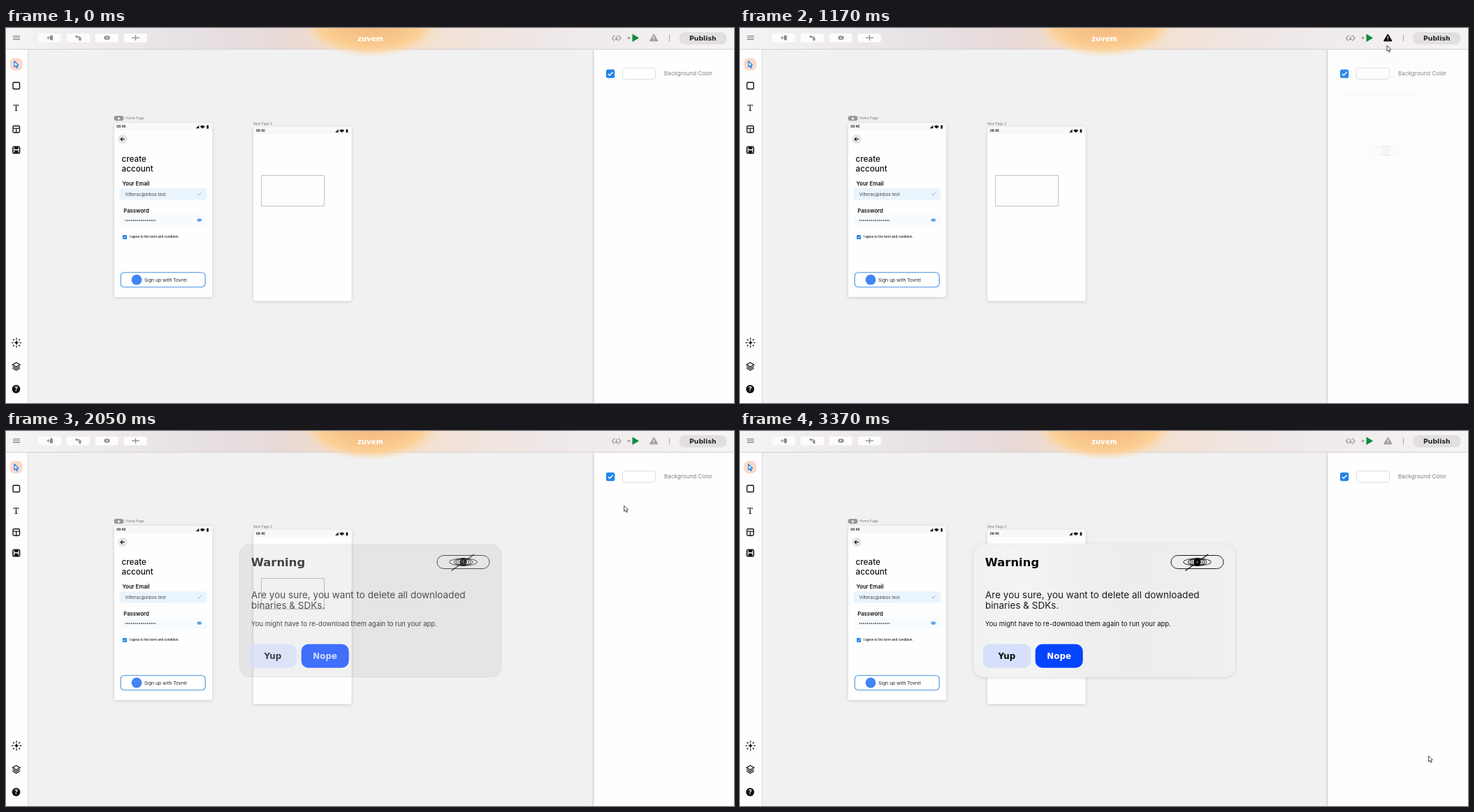
Recreate the animation shown at these times as an HTML page with a canvas. Size 1042 by 538 pixels, loop 3.44 s.

```html
<!DOCTYPE html>
<html lang="en">
<head>
<meta charset="utf-8">
<title>App builder</title>
<style>
html, body { margin: 0; width: 100%; height: 100%; overflow: hidden; background: #f1f1f1; }
canvas { display: block; width: 1042px; height: 538px; }
</style>
</head>
<body>
<canvas id="stage" width="1042" height="538"></canvas>
<script>
const c = document.getElementById('stage').getContext('2d');
const LOOP = 3440, STEPS = 50, STEP = LOOP / STEPS, LEAD = 20;
const SANS = 'Inter, "Noto Sans", sans-serif';
const WIDE = '"DejaVu Sans", Verdana, sans-serif';
const INK = '#111', GRAY = '#8c8a8c';

const spot = (x, y) => ({ x, y });
const START = spot(760, 433), CHECK = spot(869, 63), ALERT = spot(926, 25),
  ROW = spot(912, 95), YUP = spot(373, 334), END = spot(985.5, 466);

// Pointer trips: each eases out along a curve bent towards `via`
const TRIPS = [
  { start: 1, end: 9, from: START, via: spot(646, 90), to: CHECK },
  { start: 10, end: 17, from: CHECK, via: spot(985, 85), to: ALERT },
  { start: 18, end: 26, from: ALERT, to: ROW },
  { start: 29.75, end: 40, from: ROW, to: YUP },
  { start: 45, end: 49, from: YUP, via: spot(650, -35), to: END }
];

const clamp = v => Math.max(0, Math.min(1, v));
const ramp = (s, a, b) => clamp((s - a) / (b - a));
const easeOut = u => 1 - (1 - u) ** 2.1;
const within = (s, a, b) => s >= a && s <= b;

function pointerAt(s) {
  const { start, end, from, to, via = spot((from.x + to.x) / 2, (from.y + to.y) / 2) } =
    TRIPS.findLast(t => s >= t.start) || TRIPS[0];
  const k = easeOut(ramp(s, start, end)), q = 1 - k;
  const mix = axis => q * q * from[axis] + 2 * q * k * via[axis] + k * k * to[axis];
  return spot(mix('x'), mix('y'));
}

function paint(fill, stroke, width = 1) {
  if (fill) { c.fillStyle = fill; c.fill(); }
  if (stroke) { c.strokeStyle = stroke; c.lineWidth = width; c.stroke(); }
}
function box(x, y, w, h, r, fill, stroke, width) {
  c.beginPath();
  c.roundRect(x, y, w, h, r);
  paint(fill, stroke, width);
}
function oval(x, y, rx, ry, fill, stroke, width) {
  c.beginPath();
  c.ellipse(x, y, rx, ry, 0, 0, Math.PI * 2);
  paint(fill, stroke, width);
}
function line(x0, y0, x1, y1, color, width = 1) {
  c.beginPath();
  c.moveTo(x0, y0);
  c.lineTo(x1, y1);
  paint(null, color, width);
}
const hline = (x, y, w, color, width) => line(x, y, x + w, y, color, width);
const vline = (x, y, h, color, width) => line(x, y, x, y + h, color, width);
function plus(x, y, rx, ry, color, width) {
  hline(x - rx, y, 2 * rx, color, width);
  vline(x, y - ry, 2 * ry, color, width);
}
// Open arrow with its tip at x, y
function chevron(x, y, w, h, turn, color, width) {
  c.save();
  c.translate(x, y);
  c.rotate(turn * Math.PI / 2);
  c.beginPath();
  c.moveTo(-w, -h); c.lineTo(0, 0); c.lineTo(-w, h);
  c.restore();
  paint(null, color, width);
}
// Points on one or two alternating radii: polygons and stars
function star(x, y, n, rx, ry, fill, stroke, width, inner = 1) {
  c.beginPath();
  for (let i = 0; i < n; i++) {
    const a = i * 2 * Math.PI / n - Math.PI / 2, k = i % 2 ? inner : 1;
    c.lineTo(x + Math.cos(a) * rx * k, y + Math.sin(a) * ry * k);
  }
  c.closePath();
  paint(fill, stroke, width);
}
function tick(x, y, k, color, width) {
  c.beginPath();
  c.moveTo(x - 3 * k, y); c.lineTo(x - k, y + 2 * k); c.lineTo(x + 3 * k, y - 2.2 * k);
  paint(null, color, width);
}
function text(str, x, y, size, color, weight = 400, align = 'left', face = SANS) {
  c.font = `${weight} ${size}px ${face}`;
  c.textAlign = align;
  c.fillStyle = color;
  c.fillText(str, x, y);
}
const wide = (str, x, y, size, color, align = 'center') => text(str, x, y, size, color, 700, align, WIDE);

function shadowed(blur, color, draw) {
  c.save();
  c.shadowBlur = blur;
  c.shadowColor = color;
  c.shadowOffsetY = 1;
  draw();
  c.restore();
}
function spread(gradient, colors) {
  colors.forEach((color, i) => gradient.addColorStop(i / (colors.length - 1), color));
  return gradient;
}
const across = (x0, x1, ...colors) => spread(c.createLinearGradient(x0, 0, x1, 0), colors);

function glow() {
  c.save();
  c.translate(522, -4);
  c.scale(1, .46);
  oval(0, 0, 100, 100, spread(c.createRadialGradient(0, 0, 0, 0, 0, 100),
    ['#f5bb84', '#f6bf86', '#f8c68a', '#fbd198', 'rgba(250,222,190,0)']));
  c.restore();
}

function topBar(alert) {
  c.fillStyle = across(0, 1042, '#f6f4f5', '#eeeaed', '#e6e1e5', '#e8d9d8', '#f6dcc0',
    '#f2e3da', '#eee8e9', '#f2eeef', '#f7f4f5');
  c.fillRect(0, 0, 1042, 30);
  hline(0, 30.5, 1042, '#d3d0d1');
  glow();
  wide('zuvem', 521.5, 18.5, 10, '#fff');

  for (let i = 0; i < 3; i++) hline(10, 11.5 + 2.5 * i, 10, '#777');
  for (let i = 0; i < 4; i++) box(46 + 40.9 * i, 8, 33, 12.5, 2.5, '#fdfcfd');
  plus(60.5, 14, 2.5, 2.5, GRAY);
  box(63, 10.5, 4, 7, 1, GRAY);
  line(101, 12.5, 105.5, 16.5, GRAY);
  hline(101, 12.5, 5, GRAY);
  for (let i = 0; i < 3; i++) box(99.5 + 5 * Math.min(i, 1), 11 + 2.2 * i, 3, 2.6, .5, GRAY);
  oval(144.5, 14, 4.2, 2.9, GRAY);
  oval(144.5, 14, 1.2, 1.2, null, '#fff', .8);
  plus(185.5, 14, 5.5, 4, GRAY, 1.3);

  chevron(867.5, 14.5, 3.5, 4, 2, '#999', 1.2);
  chevron(880, 14.5, 3.5, 4, 0, '#999', 1.2);
  vline(873.8, 11, 6, '#999', 1.2);
  chevron(873.8, 17.2, 2.2, 2, 1, '#999', 1.2);
  oval(891.5, 14.3, 1.8, 1.8, '#a1a1a1');
  c.save();
  c.translate(899.7, 14.3);
  c.rotate(Math.PI / 2);
  star(0, 0, 3, 6.6, 6.4, '#0e8a3d');
  c.restore();
  c.lineJoin = 'round';
  const tone = alert ? '#000' : '#a1a1a1';
  star(927.3, 15.5, 3, 6.1, 6, tone, tone, 1.5);
  c.lineJoin = 'miter';
  vline(927.3, 12, 3.5, '#fff', 1.2);
  vline(927.3, 16.5, 1.2, '#fff', 1.2);
  vline(949.5, 9.5, 10, '#aaa');
  box(963.5, 6, 68, 17.5, 8, '#e2dfe1');
  wide('Publish', 997.3, 18.2, 9.3, '#222');
}

function arrow(x, y, size, color, width) {
  c.save();
  c.translate(x, y);
  c.scale(size, size);
  c.lineJoin = 'round';
  c.beginPath();
  c.moveTo(0, 0); c.lineTo(0, 8.2); c.lineTo(1.9, 6.6); c.lineTo(3.2, 9.6);
  c.lineTo(4.6, 9); c.lineTo(3.3, 6.1); c.lineTo(5.8, 5.8);
  c.closePath();
  paint('#fff', color, width);
  c.restore();
}

function sideBar() {
  c.fillStyle = '#fefefe';
  c.fillRect(0, 31, 31, 507);
  vline(31.5, 31, 507, '#dcdcdc');
  box(5.5, 43, 18, 18, 7, '#fbd9ca');
  arrow(12, 47.5, 1, '#1f82e6', 1.2);
  box(10, 78, 9.5, 9.5, 1.5, null, INK, 1.4);
  text('T', 14.6, 118.5, 13, INK, 400, 'center', '"Noto Serif", serif');
  box(10, 140.5, 9.5, 9.5, 1.5, null, INK, 1.3);
  hline(10, 144, 9.5, INK, 1.2);
  vline(14.7, 144, 6, INK, 1.2);
  box(10, 170.3, 9.5, 9.5, 1.8, null, INK, 1.6);
  box(12, 171, 5.5, 3, .5, INK);
  box(12, 175.5, 5.5, 3.5, .5, INK);

  for (let i = 0; i < 8; i++) {
    const u = Math.cos(i * Math.PI / 4), v = Math.sin(i * Math.PI / 4);
    line(15 + u * 4.6, 451.5 + v * 4.6, 15 + u * 7, 451.5 + v * 7, INK, 1.3);
  }
  star(15, 451.5, 8, 3.2, 4.2, INK, null, 0, .4);
  star(14.7, 483, 4, 5.3, 3, null, INK, 1.3);
  for (let i = 0; i < 2; i++) chevron(14.7, 488.5 + 2.5 * i, 3, 5.3, 1, INK, 1.3);
  oval(14.5, 518, 5.9, 5.9, INK);
  text('?', 14.5, 521.2, 9, '#fff', 700, 'center');
}

function phone(x, y) {
  shadowed(4, 'rgba(0,0,0,.16)', () => box(x, y, 140.5, 250, 3, '#fefefe'));
  box(x, y, 140.5, 10.5, 3, '#f8f8f8');
  text('08:46', x + 3.5, y + 7.2, 4.5, INK, 600);
  c.beginPath();
  c.moveTo(x + 117, y + 8); c.lineTo(x + 121.5, y + 3.5); c.lineTo(x + 121.5, y + 8);
  c.moveTo(x + 126.5, y + 8.2);
  c.arc(x + 126.5, y + 8.2, 4.4, -Math.PI * .8, -Math.PI * .2);
  paint(INK);
  box(x + 132.5, y + 3.6, 2.6, 4.8, .6, INK);
}

function pages() {
  box(154.5, 126, 14, 7, 3.5, '#979797');
  star(161.5, 129.2, 3, 2.3, 1.6, '#eee');
  box(160.2, 129.5, 2.6, 2, 0, '#eee');
  text('Home Page', 171, 131.3, 4.9, '#777');
  text('New Page 2', 354, 138.6, 4.8, '#777');
  phone(154.8, 136);
  phone(354.2, 141.7);
  box(365.5, 211.5, 90, 44, 0, null, '#c4c4c4');

  oval(167, 159.5, 6.8, 6.8, '#e6e6e6');
  hline(164.3, 159.5, 5.7, INK, 1.1);
  chevron(164.1, 159.5, 2.7, 2.7, 2, INK, 1.1);
  text('create', 165.5, 192, 11.7, INK, 500);
  text('account', 165.5, 206.2, 11.7, INK, 500);
  text('Your Email', 166.5, 226, 7.7, INK, 600);
  box(162.5, 230, 125, 16.5, 4, '#eaf4fd');
  text('Vilterac@inbox.test', 170.5, 240.7, 6.35, '#444');
  tick(277, 238.2, .85, '#78abdc', .9);
  text('Password', 168.3, 264.6, 7.7, INK, 600);
  box(162.5, 267.5, 125, 16.5, 4, '#f7fbfe');
  text('*'.repeat(16), 170, 279, 5.4, '#222', 500);
  oval(276.8, 275.6, 3.5, 2.3, '#6fadeb');
  oval(276.8, 275.6, 1, 1, '#4388d6');
  box(167, 297, 6, 6, 1, '#1e82e5');
  tick(170, 300, .6, '#fff', .9);
  text('I agree to the term and condition.', 176.7, 301.3, 4.5, INK, 500);
  box(164.2, 350.7, 121, 21, 5, '#fff', '#4391e0', 1.1);
  oval(187, 361.2, 7.4, 7.4, '#4285f4');
  text('Sign up with Tovrel', 198, 363.9, 6.75, '#222');
}

function sidePanel(hover) {
  shadowed(3, 'rgba(0,0,0,.18)', () => {
    c.fillStyle = '#fefefe';
    c.fillRect(841, 31, 201, 507);
  });
  vline(841, 31, 507, '#d2d2d2');
  if (hover) oval(865.3, 65.7, 13.7, 13.7, '#e8ecf0');
  box(859, 59.5, 12.2, 12.2, 2.5, '#1e83ea');
  tick(865.2, 65.7, 1.15, '#fff', 1.5);
  box(882.5, 57.5, 47, 16, 3, '#fff', '#dedede');
  text('Background Color', 942, 68.4, 8.15, '#808080');
}

function eye(x, y, k) {
  for (let rx = 10; rx < 20; rx += 3.7) oval(x, y, rx * k, 6.5 * k, null, INK, .9);
  oval(x, y, 26 * k, 6.6 * k, null, INK, .9);
  oval(x, y, 6.8 * k, 6.8 * k, '#000');
  star(x, y, 8, 3 * k, 3 * k, '#fff', null, 0, .38);
}

function menu(alpha, active) {
  if (!alpha) return;
  c.save();
  c.globalAlpha = alpha;
  shadowed(4, 'rgba(0,0,0,.15)', () => box(847, 33, 157, 163.5, 15, '#f8f8f8', '#dcdcdc', .8));
  box(847, 33, 157, 163.5, 15, across(847, 1004, '#fafafa', '#f6f6f6', '#f9f9f9'));
  if (active) box(847, 83, 157, 26.5, 0, '#ebebeb');
  for (let i = 0; i < 3; i++) hline(847, 56.5 + 26.5 * i, 157, '#d9d9d9', .9);
  text('Edit Settings.', 925.3, 47.7, 8.7, '#858585', 400, 'center');
  text('Change App name & logo.', 862, 72.7, 8.55, '#333', 600);
  text('Remove all SDKs & binaries.', 862, 99.2, 8.5, '#333', 600);
  eye(925, 176, 1);
  c.restore();
}

// See-through while fading in, frosted once settled
function dialog(alpha) {
  if (!alpha) return;
  const panel = (...style) => box(334, 162.5, 375, 190.5, 15, ...style);
  c.save();
  if (alpha < 1) {
    panel(`rgba(0,0,0,${.07 * alpha})`, `rgba(0,0,0,${.08 * alpha})`);
  } else {
    shadowed(4, 'rgba(0,0,0,.1)', () => panel('#efefef', '#e2e2e2', .8));
    panel(across(334, 709, '#f1f1f1', '#f4f4f4', '#efefef', '#ededed', '#eeeeee', '#f0f0f0'));
  }
  c.globalAlpha = alpha;
  wide('Warning', 350.8, 194.3, 16.4, '#0a0a0a', 'left');
  box(617, 178.5, 75, 19, 9.5, null, '#222', 1);
  eye(654.5, 188, .77);
  line(637.5, 200.5, 670, 177, INK, 1.3);
  text('Are you sure, you want to delete all downloaded', 351, 240.3, 13.5, '#1c1c1c');
  text('binaries & SDKs.', 351, 255.4, 13.5, '#1c1c1c');
  text('You might have to re-download them again to run your app.', 351, 280.2, 9.47, INK);
  box(348, 305.7, 68, 34, 10, '#d6dffc');
  box(422.7, 305.7, 68, 34, 10, '#0544ff');
  wide('Yup', 381.8, 327, 11.9, '#0a0a0a');
  wide('Nope', 456.7, 327, 11.9, '#fff');
  c.restore();
}

function hand(x, y) {
  c.beginPath();
  c.roundRect(x - 1, y, 1.8, 7, .9);
  c.roundRect(x - 1, y + 4, 6, 7.4, 2);
  c.roundRect(x - 3, y + 6, 3, 3, 1.2);
  paint(null, '#222', 1.6);
  paint('#fff');
  for (let i = 0; i < 3; i++) vline(x + .8 + 1.4 * i, y + 7.3, 2.5, '#555', .5);
}

function draw(s) {
  c.fillStyle = '#f1f1f1';
  c.fillRect(0, 0, 1042, 538);
  pages();
  sideBar();
  sidePanel(within(s, 9, 11));
  topBar(within(s, 16, 28));
  menu(s < 28 ? ramp(s, 16.87, 21) : 1 - ramp(s, 28, 30), s >= 23);
  dialog(ramp(s, 28, 30.67));
  if (!s) return;
  const { x, y } = pointerAt(s);
  const pressing = within(s, 9, 11) || within(s, 22, 29) || within(s, 39, 45);
  if (pressing) hand(x, y);
  else arrow(x, y, 1, '#333', .9);
}

let shown = -1;
function play(now) {
  const s = Math.floor((now % LOOP + LEAD) / STEP) % STEPS;
  if (s !== shown) draw(shown = s);
  requestAnimationFrame(play);
}
play(performance.now());
</script>
</body>
</html>
```
